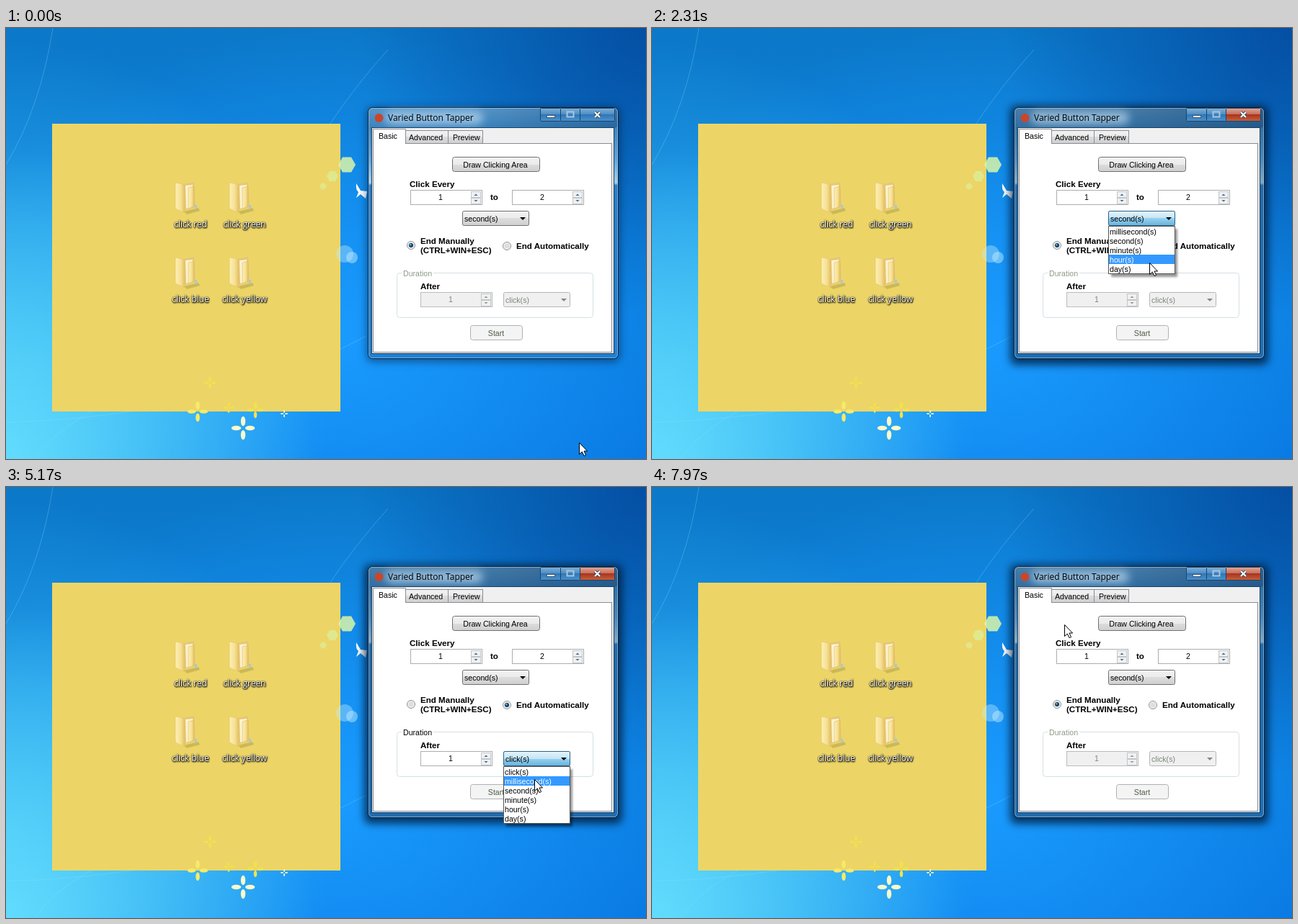
Write an HTML page that moves like this. It is 888 px wide and 599 px high and loops after 8 s.

```html
<!DOCTYPE html>
<html lang="en">
<head>
<meta charset="utf-8">
<style>
html, body { margin: 0; width: 888px; height: 599px; overflow: hidden; }
svg { position: absolute; left: 0; top: 0; }
#desk {
  background:
    radial-gradient(circle at 0 100%, #62dcfd, #62dcfd00 430px),
    radial-gradient(circle at 0 80%, #35b4f0, #35b4f000 460px),
    radial-gradient(circle at 100% 0, #044fa4, #044fa400 400px),
    radial-gradient(ellipse 540px 430px at 460px 430px, #1a9bff, #1a9bff00),
    linear-gradient(#0c78c8, #0b7fdc 50%, #0876e0);
}
text { font: 10.6px "Liberation Sans", Arial, sans-serif; white-space: pre; }
.bold { font-size: 11.6px; font-weight: bold; }
.ui { font: 12px "Open Sans", sans-serif; }
.label { fill: #fff; text-anchor: middle; text-shadow: 1px 1px 2px #000, 0 0 2px #000, 0 1px 2px #000; }
.mid { text-anchor: middle; }
.glow { filter: blur(6px); }
</style>
</head>
<body>
<svg id="desk" width="888" height="599">
  <defs>
    <linearGradient id="face" x2="0" y2="1">
      <stop stop-color="#f2f2f2"/><stop offset=".5" stop-color="#ebebeb"/>
      <stop offset=".5" stop-color="#ddd"/><stop offset="1" stop-color="#cfcfcf"/>
    </linearGradient>
    <linearGradient id="hot" x2="0" y2="1">
      <stop stop-color="#eaf6fd"/><stop offset=".5" stop-color="#d9f0fc"/>
      <stop offset=".5" stop-color="#bee6fd"/><stop offset="1" stop-color="#a7d9f5"/>
    </linearGradient>
    <linearGradient id="down" x2="0" y2="1">
      <stop stop-color="#e5f4fc"/><stop offset=".5" stop-color="#c4e5f6"/>
      <stop offset=".5" stop-color="#98d1ef"/><stop offset="1" stop-color="#68b3db"/>
    </linearGradient>
    <linearGradient id="red" x2="0" y2="1">
      <stop stop-color="#e0a698"/><stop offset=".45" stop-color="#c8705c"/>
      <stop offset=".45" stop-color="#a5301c"/><stop offset="1" stop-color="#c8613a"/>
    </linearGradient>
    <linearGradient id="blue" x2="0" y2="1">
      <stop stop-color="#7fb0d8"/><stop offset=".45" stop-color="#4f8fc6"/>
      <stop offset=".45" stop-color="#2d74b4"/><stop offset="1" stop-color="#4a92ce"/>
    </linearGradient>
    <linearGradient id="glass" x2="0" y2="1">
      <stop stop-color="#5b98c8"/><stop offset=".08" stop-color="#3c84c0"/>
      <stop offset=".2" stop-color="#5aa0d8"/><stop offset=".3" stop-color="#a4cdea"/>
      <stop offset=".31" stop-color="#2a7cc4"/><stop offset="1" stop-color="#2280d2"/>
    </linearGradient>
    <linearGradient id="shade">
      <stop offset=".4" stop-color="#0a3c70" stop-opacity="0"/><stop offset="1" stop-color="#0a3c70" stop-opacity=".4"/>
    </linearGradient>
    <linearGradient id="paper">
      <stop stop-color="#fdf0b4"/><stop offset=".6" stop-color="#f6df92"/><stop offset="1" stop-color="#e3bf5e"/>
    </linearGradient>
  </defs>
  <g id="wall"></g>
  <g id="app"></g>
  <path id="pointer" d="M.5 .5V16.5L4.3 13L7 18.6L9.6 17.6L7 12H11.6Z" fill="#fff" stroke="#000"/>
</svg>
<script>
const $ = id => document.getElementById(id);
const rect = (x, y, w, h, fill, stroke = 'none', r = 0, extra = '') =>
  `<rect x="${x}" y="${y}" width="${w}" height="${h}" rx="${r}" fill="${fill}" stroke="${stroke}" ${extra}/>`;
const text = (x, y, s, cls = '', fill = '#000') =>
  `<text x="${x}" y="${y}" class="${cls}" fill="${fill}">${s}</text>`;
const path = (d, fill, stroke = 'none', extra = '') =>
  `<path d="${d}" fill="${fill}" stroke="${stroke}" ${extra}/>`;

// ---- desktop ----
function folder(x, y, name) {
  return `<g transform="translate(${x - 23} ${y})">` +
    path('M14 42L34 37L36 41L18 46Z', '#0002') +
    path('M12 4L28 1L30 36L14 40Z', '#e6c778') +
    path('M16 6L26 5V35L17 38Z', '#fdf3cf') +
    path('M20 9L28 7V35L20 38Z', 'url(#paper)', '#dcbb66', 'stroke-width=".6"') +
    path('M2 2L13 4Q15 5 15 8V44L4 39Q2 38 2 36Z', 'url(#paper)', '#e2c573', 'stroke-width=".6"') +
    path('M29 33H32V38L29 39Z', '#a9c9d0') + '</g>' +
    text(x, y + 64, name, 'ui label', '#fff');
}
function flower(x, y, r, fill) {
  const petal = a => `<ellipse cy="${-r * .6}" rx="${r * .2}" ry="${r * .42}" transform="rotate(${a})"/>`;
  return `<g transform="translate(${x} ${y})" fill="${fill}">${[0, 90, 180, 270].map(petal).join('')}</g>`;
}
function hexagon(x, y, r, opacity) {
  const points = [0, 1, 2, 3, 4, 5].map(i =>
    `${x + r * Math.cos(i * Math.PI / 3)},${y + r * Math.sin(i * Math.PI / 3)}`);
  return `<polygon points="${points.join(' ')}" fill="#d9f5a8" opacity="${opacity}"/>`;
}
$('wall').innerHTML =
  path('M65 0Q48 110 0 190M530 30Q440 130 390 240M0 548Q290 540 500 428M40 599Q110 500 330 480', 'none', '#8fdcff', 'opacity=".3"') +
  rect(64, 133, 400, 400, '#ecd566') +
  hexagon(473, 190, 12, .85) + hexagon(453, 206, 8, .6) + hexagon(440, 220, 5, .5) +
  `<circle cx="470" cy="314" r="12" fill="#bdeaff" opacity=".4"/><circle cx="480" cy="319" r="8" fill="#bdeaff" opacity=".5"/>` +
  path('M492 226L486 216Q485 225 489 228L486 236L492 231L499 237L501 227Z', '#fff') +
  flower(266, 533, 14, '#f7ea67') + flower(346, 531, 11, '#f3e14d') + flower(283, 493, 8, '#f3e14d') +
  flower(309, 528, 7, '#f3e14d') + flower(329, 556, 16, '#fbf9c9') + flower(386, 536, 5, '#fbf9c9') +
  folder(256, 213, 'click red') + folder(331, 213, 'click green') +
  folder(256, 317, 'click blue') + folder(331, 317, 'click yellow');

// ---- controls ----
const arrow = (x, y, r, fill, dir = 1) => path(`M${x - r} ${y}H${x + r}L${x} ${y + r * dir}Z`, fill);

function spinner(x, y, value, on = true) {
  let s = rect(x + .5, y + .5, 99, 20, on ? '#fff' : '#f0f0f0', on ? '#abadb3' : '#bbb') +
    text(x + 42, y + 14, value, 'mid', on ? '#000' : '#7d8579');
  for (const [dy, dir] of [[2, -1], [11, 1]])
    s += rect(x + 84.5, y + dy + .5, 13, 8, '#f1f1f1', '#c2c6ca') +
      arrow(x + 91, y + dy + (dir < 0 ? 6 : 3), 2.6, on ? '#3d6fa5' : '#999', dir);
  return s;
}
function combo(x, y, label, heat, open, on = true) {
  const border = on ? '#707070' : '#b5b5b5', ink = on ? '#000' : '#7d8579';
  return rect(x + .5, y + .5, 92, 20, on ? 'url(#face)' : '#f0f0f0', border, 2) +
    (heat ? rect(x + .5, y + .5, 92, 20, `url(#${open ? 'down' : 'hot'})`, open ? '#2c628b' : '#3c7fb1', 2, `opacity="${heat}"`) : '') +
    text(x + 3, y + 14.5, label, '', ink) + arrow(x + 84, y + 9, 4, on ? '#000' : '#888');
}
function radio(x, y, checked, hot) {
  return `<circle cx="${x}" cy="${y}" r="5.5" fill="${hot ? '#d5effc' : '#f4f4f4'}" stroke="${hot ? '#3c7fb1' : '#8e8f8f'}"/>` +
    `<circle cx="${x}" cy="${y}" r="3.8" fill="${hot ? '#bfe4f8' : '#dcdfe2'}"/>` +
    (checked ? `<circle cx="${x}" cy="${y}" r="3" fill="#17415f"/><circle cx="${x - .7}" cy="${y - .8}" r="1.3" fill="#4fb8e6"/>` : '');
}
function list(x, y, items, picked, hidden) {
  const h = items.length * 13 + 2, shown = h - hidden;
  const rows = items.map((item, i) =>
    (i === picked ? rect(x + 1, y + 1 + i * 13, 91, 13, '#39f') : '') +
    text(x + 2, y + 11.5 + i * 13, item, '', i === picked ? '#fff' : '#000')).join('');
  return rect(x + 4, y + 4, 92, shown, '#000', 'none', 1, 'opacity=".4" style="filter:blur(1.5px)"') +
    `<clipPath id="slot">${rect(x, y, 94, h)}</clipPath><g clip-path="url(#slot)"><g transform="translate(0 ${-hidden})">` +
    rect(x + .5, y + .5, 92, h - 1, '#fff', '#555') + rows + '</g></g>';
}

function frame(active) {
  const button = (x, w, fill) => rect(x + .5, 111.5, w, 18, fill, '#1d4468', 1);
  return rect(active ? 497 : 500, active ? 108 : 110, active ? 358 : 352, active ? 360 : 354, '#001c3c', 'none', 8,
      `class="glow" opacity="${active ? .8 : .5}"`) +
    rect(502.5, 110.5, 347, 349, 'url(#glass)', '#0b2138', 6) +
    rect(503, 111, 346, 28, 'url(#shade)', 'none', 5) +
    (active ? rect(503, 111, 346, 348, '#14304c', 'none', 5, 'opacity=".25"') : '') +
    rect(503.5, 111.5, 345, 347, 'none', '#a9d4f4', 5, 'opacity=".6"') +
    rect(526, 116, 136, 18, '#cfe7f8', 'none', 9, 'class="glow" opacity=".6"') +
    '<circle cx="517.5" cy="125" r="6" fill="#c9462b"/>' +
    text(530, 129, 'Varied Button Tapper', 'ui') +
    button(741, 28, 'url(#blue)') + button(769, 27, 'url(#blue)') + button(796, 48, active ? 'url(#red)' : 'url(#blue)') +
    rect(750.5, 121.5, 11, 3, '#fff', '#44566a') +
    rect(778.5, 116.5, 9, 7, 'none', '#a9c6de', 0, 'stroke-width="2"') +
    path('M817 117L824 124M824 117L817 124', 'none', '#34485c', 'stroke-width="4"') +
    path('M817 117L824 124M824 117L817 124', 'none', '#fff', 'stroke-width="2.2"') +
    rect(507.5, 138.5, 336, 314, '#f0f0f0', '#17405f') +
    rect(509.5, 160.5, 331, 290, '#fff', '#898c95') +
    rect(554.5, 142.5, 59, 18, 'url(#face)', '#898c95') + rect(613.5, 142.5, 48, 18, 'url(#face)', '#898c95') +
    path('M509.5 161V140.5H554.5V161', '#fff', '#898c95') + rect(510, 159, 44, 3, '#fff') +
    text(517, 154, 'Basic') + text(559, 156, 'Advanced') + text(620, 156, 'Preview') +
    rect(619.5, 179.5, 121, 20, 'url(#face)', '#707070', 3) + text(679, 194, 'Draw Clicking Area', 'mid');
}

// ---- timeline ----
// start, end, steps, then the start, control and end points of a curve
const moves = [
  [70, 840, 10, 795, 576, 630, 330, 695, 268],
  [1700, 2010, 5, 695, 268, 684, 317, 690, 346],
  [2160, 2490, 5, 690, 346, 690, 320, 688, 296],
  [2850, 3630, 11, 688, 296, 650, 305, 698, 300],
  [3710, 4480, 11, 698, 300, 720, 335, 736, 371],
  [5090, 5400, 5, 736, 371, 731, 415, 733, 458],
  [5780, 6550, 11, 733, 458, 747, 401, 601, 303],
  [7720, 7970, 4, 601, 303, 588, 245, 572, 191],
];
// fraction done, in equal steps, the first one taken at once
const stepped = (t, start, end, n) =>
  t < start ? 0 : Math.min(n, Math.floor((t - start + 6) / (end - start) * (n - 1)) + 1) / n;

function pointerAt(t) {
  const m = moves.findLast(move => t >= move[0]) || moves[0];
  const [start, end, n, x0, y0, cx, cy, x1, y1] = m;
  const u = stepped(t, start, end, n), v = 1 - u;
  const mix = (a, b, c) => Math.round(v * v * a + 2 * u * v * b + u * u * c);
  return [mix(x0, cx, x1), mix(y0, cy, y1)];
}
const units = ['millisecond(s)', 'second(s)', 'minute(s)', 'hour(s)', 'day(s)'];
const limits = ['click(s)', ...units];
const hiddenPart = (t, start, end, n, first) => Math.round(first * (1 - stepped(t, start, end, n)) * n / (n - 1));
const rowAt = (y, top, items, chosen) =>
  y < top ? chosen : Math.min(items.length - 1, Math.floor((y - top - 1) / 13));

function scene(t, x, y) {
  const over = (l, top, r, b) => x >= l && x < r && y >= top && y < b;
  const auto = t >= 3630 && t < 7100;
  const unitsOpen = t >= 1070 && t < 2850, limitsOpen = t >= 4560 && t < 6165;
  const listed = unitsOpen || limitsOpen;
  const unitHeat = unitsOpen || over(633, 254, 726, 275) ? 1 : 0;
  const limitHeat = limitsOpen || auto && over(690, 367, 783, 388) ? 1
    : t >= 6165 && t < 6800 ? 1 - stepped(t, 6630, 6800, 3) : 0;
  const ink = auto ? '#000' : '#8d9a86';

  return frame(t >= 1070) +
    text(560, 221, 'Click Every', 'bold') + spinner(561, 225, 1) + text(672, 239, 'to', 'bold') + spinner(702, 225, 2) +
    combo(633, 254, 'second(s)', unitHeat, unitsOpen && t >= 1160) +
    radio(562, 302, !auto, !listed && over(556, 289, 681, 316)) +
    text(575, 300, 'End Manually', 'bold') + text(575, 313, '(CTRL+WIN+ESC)', 'bold') +
    radio(695, 303, auto, !listed && over(689, 294, 811, 312)) + text(708, 307, 'End Automatically', 'bold') +
    rect(542.5, 340.5, 272, 62, 'none', '#d5dfe5', 4) + rect(549, 338, 44, 6, '#fff') + text(551, 345, 'Duration', '', ink) +
    text(575, 363, 'After', 'bold') + spinner(575, 367, 1, auto) +
    combo(690, 367, 'click(s)', limitHeat, limitsOpen, auto) +
    rect(644.5, 413.5, 72, 20, '#f4f4f4', '#adb2b5', 3) + text(680, 428, 'Start', 'mid', '#4f5a48') +
    (unitsOpen ? list(633, 275, units, rowAt(y, 275, units, 1), hiddenPart(t, 1070, 1250, 3, 35)) : '') +
    (limitsOpen ? list(690, 388, limits, rowAt(y, 388, limits, 0), hiddenPart(t, 4560, 4790, 4, 52)) : '');
}

let shown = '';
function draw() {
  const t = performance.now() % 8000, [x, y] = pointerAt(t);
  const html = scene(t, x, y);
  if (html !== shown) $('app').innerHTML = shown = html;
  $('pointer').setAttribute('transform', `translate(${x} ${y})`);
  requestAnimationFrame(draw);
}
draw();
</script>
</body>
</html>
```
